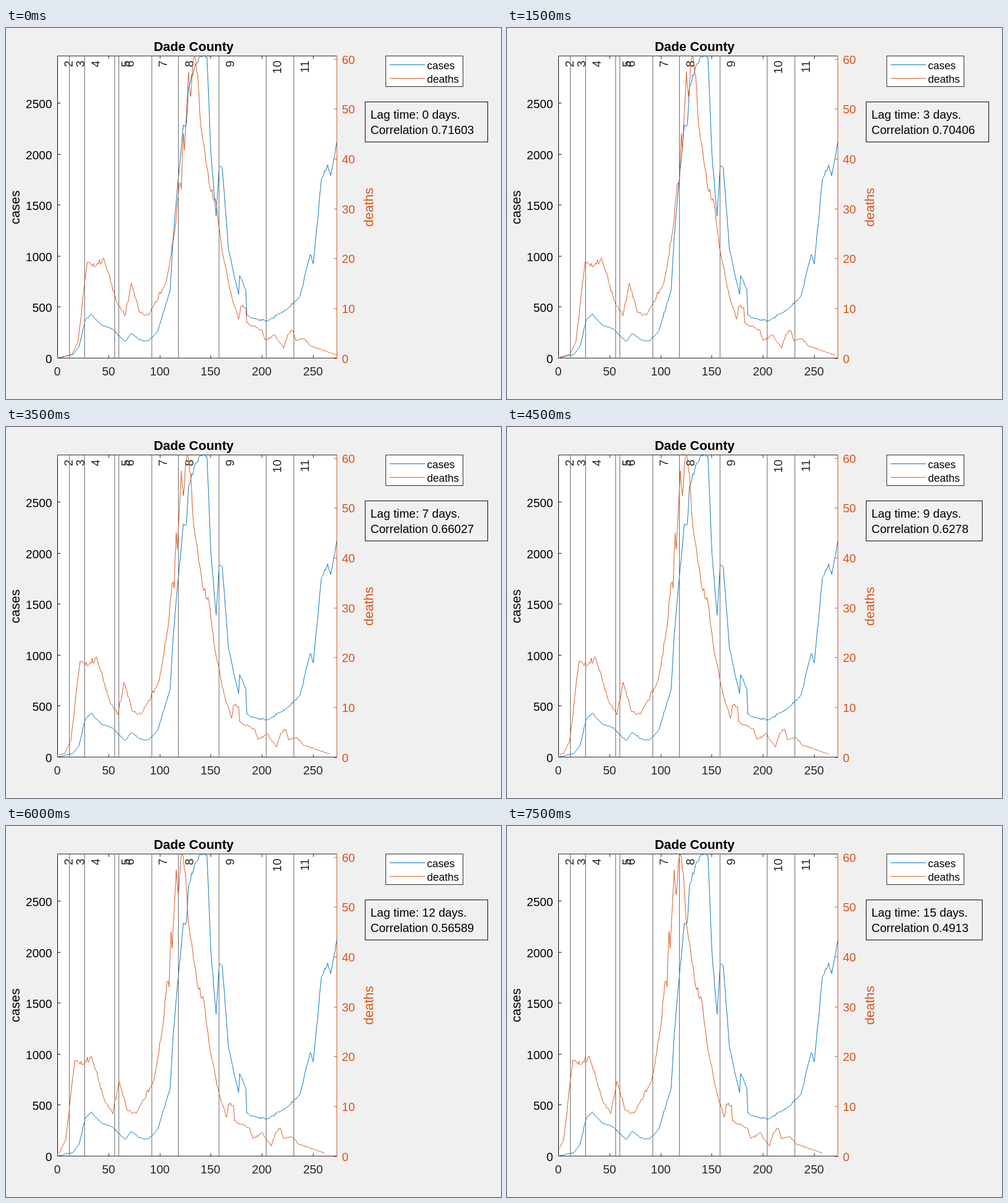
An HTML page with a canvas for the animation above (8000 ms loop, 840 by 630 pixels).

```html
<!DOCTYPE html>
<html lang="en">
<head>
<meta charset="utf-8">
<title>Lagged correlation</title>
<style>
html, body { margin: 0; width: 100%; height: 100%; overflow: hidden; background: #f0f0f0; }
canvas { display: block; }
</style>
</head>
<body>
<canvas id="stage" width="840" height="630"></canvas>
<script>
const ctx = document.getElementById('stage').getContext('2d');
const LEFT = 87.5, RIGHT = 561.5, TOP = 47.5, BOTTOM = 560.5;
const DAY = 1.736, CASE = 0.17307, DEATH = 8.465;   // pixels per unit
const DAYS = 273, STEP = 500, LAGS = 16;
const INK = '#262626', BLUE = '#0072bd', ORANGE = '#d95319', GREY = '#676767';

// Turning points of each curve: day, height above the axis
const caseKeys = [
  [0, 0], [15, 6], [21, 20], [27, 64], [33, 75], [43, 56], [54, 49], [66, 28], [72, 42], [80, 31],
  [89, 29], [98, 46], [110, 115], [113, 205], [119, 323], [123, 396], [126, 398], [128, 460],
  [134, 495], [140, 513], [146, 511], [150, 345], [155, 241], [158, 325], [161, 323], [167, 185],
  [177, 108], [178, 140], [184, 116], [185, 73], [192, 67], [205, 63], [225, 84], [237, 105],
  [247, 176], [250, 160], [258, 305], [264, 328], [267, 310], [273, 367]
];
const deathKeys = [
  [0, 0], [14, 6], [20, 28], [29, 163], [38, 157], [45, 170], [59, 90], [66, 72], [72, 127], [80, 78],
  [89, 73], [106, 128], [115, 221], [119, 296], [121, 287], [123, 381], [124, 353], [128, 486],
  [130, 444], [132, 497], [134, 513], [137, 480], [140, 395], [149, 288], [155, 264], [161, 181],
  [168, 119], [177, 66], [179, 88], [184, 86], [185, 60], [200, 47], [203, 30], [212, 40],
  [221, 17], [225, 40], [230, 47], [233, 29], [241, 33], [248, 20], [273, 5]
];
const correlationKeys = [
  [0, 0.71603], [3, 0.70406], [5, 0.68732], [6, 0.67469],
  [7, 0.66027], [9, 0.6278], [12, 0.56589], [15, 0.4913]
];
const phases = [87.5, 107.5, 133.5, 184.5, 191.5, 247.5, 292.5, 361.5, 441.5, 488.5];

// Linear interpolation, with noise that fades out at the keys
function sample(keys, x, noise = 0) {
  const next = Math.max(1, keys.findIndex(key => key[0] >= x));
  const [x0, y0] = keys[next - 1], [x1, y1] = keys[next];
  const u = (x - x0) / (x1 - x0);
  const y = y0 + (y1 - y0) * u;
  return y + noise * Math.sqrt(y) * 4 * u * (1 - u);
}

function series(keys, roughness, seed) {
  const random = () => {
    seed = (seed * 16807) % 2147483647;
    return seed / 2147483647 - 0.5;
  };
  return Array.from({ length: DAYS + 1 }, (_, day) => sample(keys, day, roughness * random()));
}

const cases = series(caseKeys, 0.5, 4211);
const deaths = series(deathKeys, 0.9, 977);

function line(x1, y1, x2, y2, color) {
  ctx.strokeStyle = color;
  ctx.beginPath();
  ctx.moveTo(x1, y1);
  ctx.lineTo(x2, y2);
  ctx.stroke();
}

function text(str, x, y, { size = 20, color = '#000', align = 'left', bold = '', turn = false } = {}) {
  ctx.save();
  ctx.translate(x, y);
  if (turn) ctx.rotate(-Math.PI / 2);
  ctx.font = `${bold} ${size}px "Liberation Sans", Arial, sans-serif`;
  ctx.fillStyle = color;
  ctx.textAlign = align;
  ctx.fillText(str, 0, 0);
  ctx.restore();
}

function box(x, y, right, bottom, fill, edge) {
  ctx.fillStyle = fill;
  ctx.fillRect(x, y, right - x, bottom - y);
  ctx.strokeStyle = edge;
  ctx.strokeRect(x, y, right - x, bottom - y);
}

function curve(heights, lag, color) {
  ctx.save();
  ctx.beginPath();
  ctx.rect(LEFT + DAY, TOP - 1, RIGHT + 1 - LEFT - DAY, BOTTOM - TOP + 2);
  ctx.clip();
  ctx.beginPath();
  heights.forEach((h, day) => ctx.lineTo(LEFT + (day - lag) * DAY, BOTTOM - h));
  ctx.strokeStyle = color;
  ctx.lineJoin = 'round';
  ctx.stroke();
  ctx.restore();
}

function axes() {
  line(LEFT, TOP, RIGHT, TOP, INK);
  line(LEFT, BOTTOM, RIGHT, BOTTOM, INK);
  line(LEFT, TOP, LEFT, BOTTOM, '#000');
  line(RIGHT, TOP, RIGHT, BOTTOM, ORANGE);
  for (let d = 0; d <= 250; d += 50) {
    const x = Math.floor(LEFT + d * DAY) + 0.5;
    line(x, BOTTOM, x, BOTTOM - 5, INK);
    line(x, TOP, x, TOP + 5, INK);
    text(d, x - 0.5, 590, { color: INK, align: 'center' });
  }
  for (let n = 0; n <= 2500; n += 500) {
    const y = Math.floor(BOTTOM - n * CASE) + 0.5;
    line(LEFT, y, LEFT + 5, y, '#000');
    text(n, 78, y + 8, { align: 'right' });
  }
  for (let n = 0; n <= 60; n += 10) {
    const y = Math.round(BOTTOM - n * DEATH) + 0.5;
    line(RIGHT - 5, y, RIGHT, y, ORANGE);
    text(n, 570, y + 7.5, { color: ORANGE });
  }
  text('Dade County', 318.5, 39, { size: 22, align: 'center', bold: 'bold' });
  text('cases', 23, 304.5, { size: 22, align: 'center', turn: true });
  text('deaths', 623, 304.5, { size: 22, align: 'center', turn: true, color: ORANGE });
}

function legend() {
  box(644.5, 47.5, 775.5, 99.5, '#fff', INK);
  [['cases', BLUE], ['deaths', ORANGE]].forEach(([name, color], i) => {
    const y = 62.5 + 23 * i;
    line(651, y, 711, y, color);
    text(name, 714.5, y + 7.5, { size: 18 });
  });
}

function draw(lag) {
  ctx.lineWidth = 1;
  ctx.fillStyle = '#f0f0f0';
  ctx.fillRect(0, 0, 840, 630);
  ctx.fillStyle = '#fff';
  ctx.fillRect(LEFT, TOP, RIGHT - LEFT, BOTTOM - TOP);

  axes();
  curve(cases, 0, BLUE);
  phases.forEach((x, i) => {
    if (x > LEFT) line(x, TOP, x, BOTTOM, GREY);
    text(i + 2, x + 25, 55.5, { color: INK, align: 'right', turn: true });
  });
  curve(deaths, lag, ORANGE);
  legend();

  const value = String(Number(sample(correlationKeys, lag).toFixed(5)));
  box(609.5, 125.5, value.length < 7 ? 806.5 : 817.5, 193.5, '#f0f0f0', '#000');
  text(`Lag time: ${lag} days.`, 618.5, 153.5);
  text(`Correlation ${value}`, 618.5, 179.5);
}

function tick() {
  draw(Math.floor(performance.now() / STEP) % LAGS);
  requestAnimationFrame(tick);
}
tick();
</script>
</body>
</html>
```
